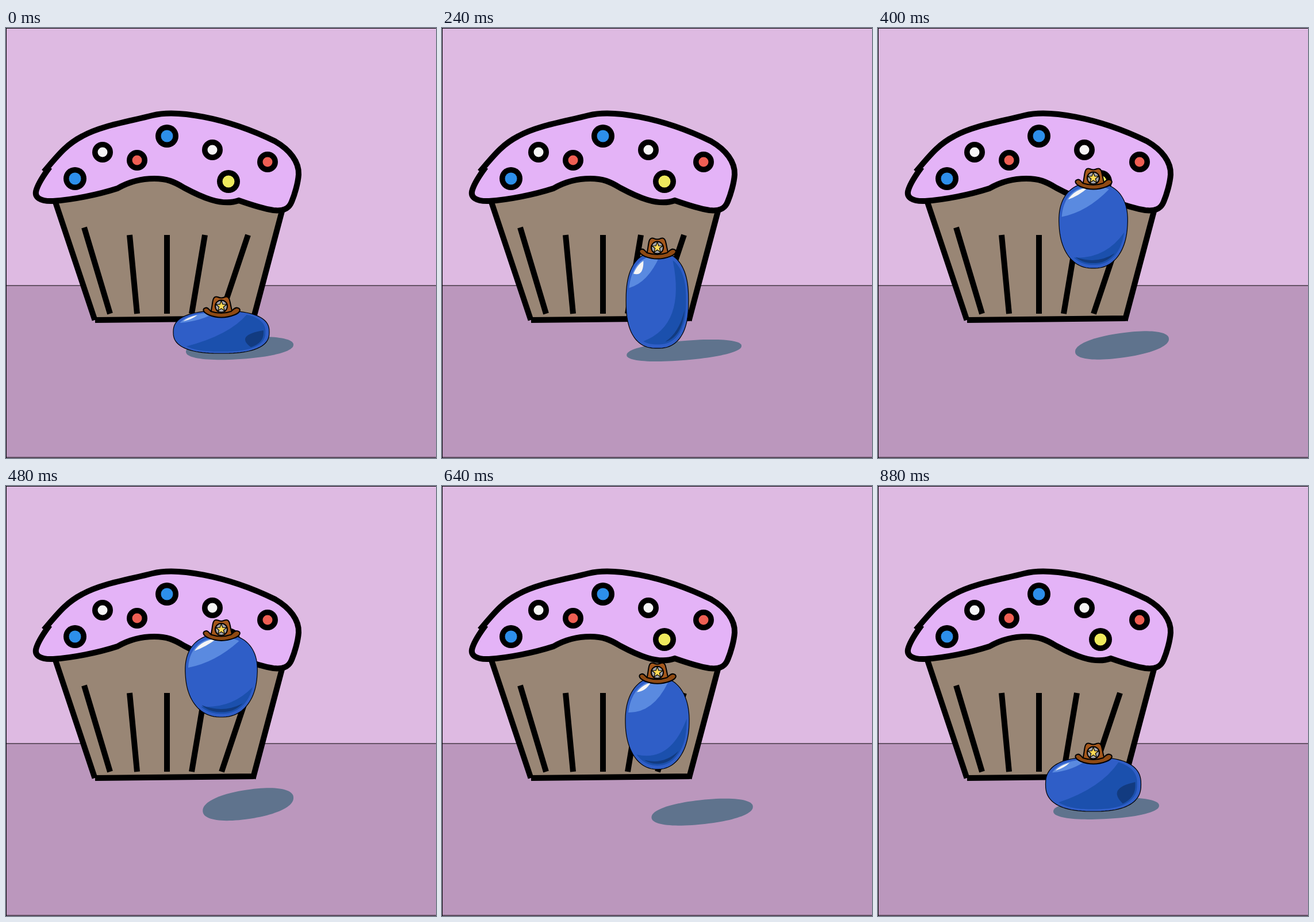
Animation of 748 by 748 pixels, one loop 960 ms. Source, as an HTML page with a canvas:

```html
<!DOCTYPE html>
<html lang="en">
<head>
<meta charset="utf-8">
<title>Bouncing blueberry</title>
<style>
  html, body { margin: 0; width: 100%; height: 100%; overflow: hidden; }
  canvas { display: block; width: 748px; height: 748px; }
</style>
</head>
<body>
<canvas id="stage" width="748" height="748"></canvas>
<script>
const ctx = document.getElementById('stage').getContext('2d');
const STEP = 80, STEPS = 12;
const CENTER = 374.5, GROUND = 567;

// Looks: shape is roundness and taper; the crescents are from, to (degrees) and depth.
const looks = {
  flat: { shape: [2.5, 0], light: [203, 265, 0.62], shade: [-60, 138, 0.2], core: [-3, 50, 0.3], shine: [210, 241, 0.8] },
  round: { shape: [2.4, 0], light: [193, 272, 0.3], shade: [-48, 115, 0.95], core: [0, 57, 0.75], shine: [202, 235, 0.55] },
  tall: { shape: [2.5, 0], light: [192, 275, 0.6], shade: [-68, 118, 0.95], core: [22, 100, 1], shine: [226, 256, 0.72] },
  egg: { shape: [2.3, 0.07], light: [190, 295, 0.35], shade: [8, 128, 0.85], core: [45, 125, 0.92], shine: [220, 263, 0.77] },
  fall: { shape: [2.15, 0], light: [196, 280, 0.2], shade: [-22, 140, 0.92], core: [33, 100, 0.85], shine: [232, 253, 0.75] },
};

// Key poses: span is top, bottom, half width; shadow is x, y, rx, ry, tilt.
const key = (look, span, shadow) => ({ ...looks[look], span, shadow });
const poses = {
  0: key('flat', [492, 566, 83.5], [406.5, 557, 93.5, 19, -6]),
  2: key('round', [449, 566, 64.5], [410, 563.5, 87, 21.5, -4]),
  4: key('tall', [329, 534, 48], [431, 557, 110, 13, -12]),
  5: key('egg', [269, 418, 59.5], [424.5, 552, 81.5, 21.5, -11]),
  7: key('egg', [270, 419, 62.5], [424.5, 558, 81.5, 27, -11]),
  9: key('fall', [403, 566.5, 52], [471.5, 574, 94.5, 15, -7]),
  11: key('flat', [472, 566, 83], [397, 561, 92, 18, -5]),
};

// Smooth midpoint of b and c, carried by the poses around them.
function between(a, b, c, d) {
  const pose = {};
  for (const part in b) {
    pose[part] = b[part].map((v, i) => (9 * (v + c[part][i]) - a[part][i] - d[part][i]) / 16);
  }
  return pose;
}

const steps = Object.keys(poses).map(Number);
steps.forEach((step, i) => {
  const near = n => poses[steps[(i + n + steps.length) % steps.length]];
  const next = (step + 1) % STEPS;
  if (!steps.includes(next)) poses[next] = between(near(-1), near(0), near(1), near(2));
});

// Returns a function giving the point of a superellipse at an angle and scale.
function superellipse(x, y, rx, ry, roundness, taper = 0, tilt = 0) {
  const power = v => Math.sign(v) * Math.abs(v) ** (2 / roundness);
  return (degrees, scale = 1) => {
    const angle = degrees * Math.PI / 180;
    const u = power(Math.cos(angle)) * scale, v = power(Math.sin(angle)) * scale;
    return [x + rx * u * (1 - taper * v), y + ry * v + tilt * u];
  };
}

function arc(rim, from, to, scale) {
  const path = new Path2D();
  for (let i = 0; i <= 90; i++) path.lineTo(...rim(from + (to - from) * i / 90, scale));
  return path;
}

function closed(rim) {
  const path = arc(rim, 0, 360, 1);
  path.closePath();
  return path;
}

function crescent(rim, [from, to, depth], scale) {
  const path = arc(rim, from, to, scale);
  path.quadraticCurveTo(...rim((from + to) / 2, depth), ...rim(from, scale));
  return path;
}

function paint(path, fill, lineWidth) {
  if (fill) {
    ctx.fillStyle = fill;
    ctx.fill(path);
  }
  if (lineWidth) {
    ctx.lineWidth = lineWidth;
    ctx.stroke(path);
  }
}

function disc(x, y, r, fill) {
  ctx.fillStyle = fill;
  ctx.beginPath();
  ctx.arc(x, y, r, 0, Math.PI * 2);
  ctx.fill();
}

const roomLines = new Path2D('M0 .5H748M0 448H748M0 747H748M.5 0V748');

function drawRoom() {
  ctx.fillStyle = '#debae2';
  ctx.fillRect(0, 0, 748, 448);
  ctx.fillStyle = '#bb97bd';
  ctx.fillRect(0, 448, 748, 300);
  paint(roomLines, null, 1);
}

const cup = new Path2D('M85 300L155 508L430 505L481 315L260 250Z');
const ribs = new Path2D('M85 300L154.500 508M155 508L431 505M429.500 509L481 315' +
  'M136 347L181 497M215 360L228 497M280 360V497M346 360L323 497M421 360L375 497');
const icing = new Path2D('M66 250C95 215 108 201 133 188C165 170 212 163 255 152' +
  'C295 142 380 154 468 197C494 212 510 233 509 255C508 270 502 290 497 302' +
  'C492 315 482 319 465 317C445 314 425 307 405 300C375 311 338 293 310 278' +
  'C292 267 280 262 258 262C235 262 213 268 194 279C160 290 115 299 82 301' +
  'C60 302 48 295 53 281C57 269 64 258 76 242');
const BLUE = '#2d8fea', RED = '#ef5f53', WHITE = '#f5f5f5', YELLOW = '#eeea5d';
const sprinkles = [
  [120, 262, 20, BLUE], [168, 216, 18, WHITE], [228, 230, 18, RED], [280, 188, 20, BLUE],
  [359, 212, 18, WHITE], [387, 267, 20, YELLOW], [455, 233, 18, RED],
];

function drawMuffin() {
  paint(cup, '#998675');
  paint(ribs, null, 10);
  paint(icing, '#e4b3f7', 10);
  for (const [x, y, r, color] of sprinkles) {
    disc(x, y, r, '#000');
    disc(x, y, r - 9.5, color);
  }
}

const crown = new Path2D('M-19 13C-16 4 -16 -6 -14 -12Q-12 -18 -6 -16Q0 -13 6 -16Q12 -18 14 -12C16 -6 17 4 20 13Z');
const brim = new Path2D('M-28 3C-34 5 -31 11 -22 15Q0 24 23 15C33 11 35 5 29 3' +
  'C24 1 21 6 17 9Q0 15 -18 9C-21 6 -24 1 -28 3Z');
const star = new Path2D();
for (let i = 0; i < 10; i++) {
  const r = i % 2 ? 3.3 : 8, angle = i * Math.PI / 5;
  star.lineTo(r * Math.sin(angle), -r * Math.cos(angle));
}
star.closePath();

function drawHat(x, y) {
  ctx.save();
  ctx.translate(x, y);
  paint(crown, '#a4571b', 2);
  paint(brim, '#8f4a13', 2);
  disc(0, 0, 11.5, '#000');
  disc(0, 0, 9.5, '#a3a3a8');
  paint(star, '#ffda55', 2.5);
  paint(star, '#ffda55');
  ctx.restore();
}

function drawBerry({ span, shape, shadow, light, shade, core, shine }) {
  const [top, low, halfWidth] = span;
  const [x, y, rx, ry, tilt] = shadow;
  const bottom = Math.min(low, GROUND);
  const rim = superellipse(CENTER, (top + bottom) / 2, halfWidth, (bottom - top) / 2, ...shape);
  paint(closed(superellipse(x, y, rx, ry, 2.2, 0, tilt)), '#5f738d');
  paint(closed(rim), '#2f5ec7', 1.2);
  paint(crescent(rim, shade, 0.92), '#1b50ad');
  paint(crescent(rim, core, 0.88), '#123b80');
  paint(crescent(rim, light, 0.92), '#5a8ae0');
  paint(crescent(rim, shine, 0.89), WHITE);
  drawHat(CENTER, top - 8);
}

function frame() {
  drawRoom();
  drawMuffin();
  drawBerry(poses[Math.floor(performance.now() / STEP) % STEPS]);
  requestAnimationFrame(frame);
}
frame();
</script>
</body>
</html>
```
